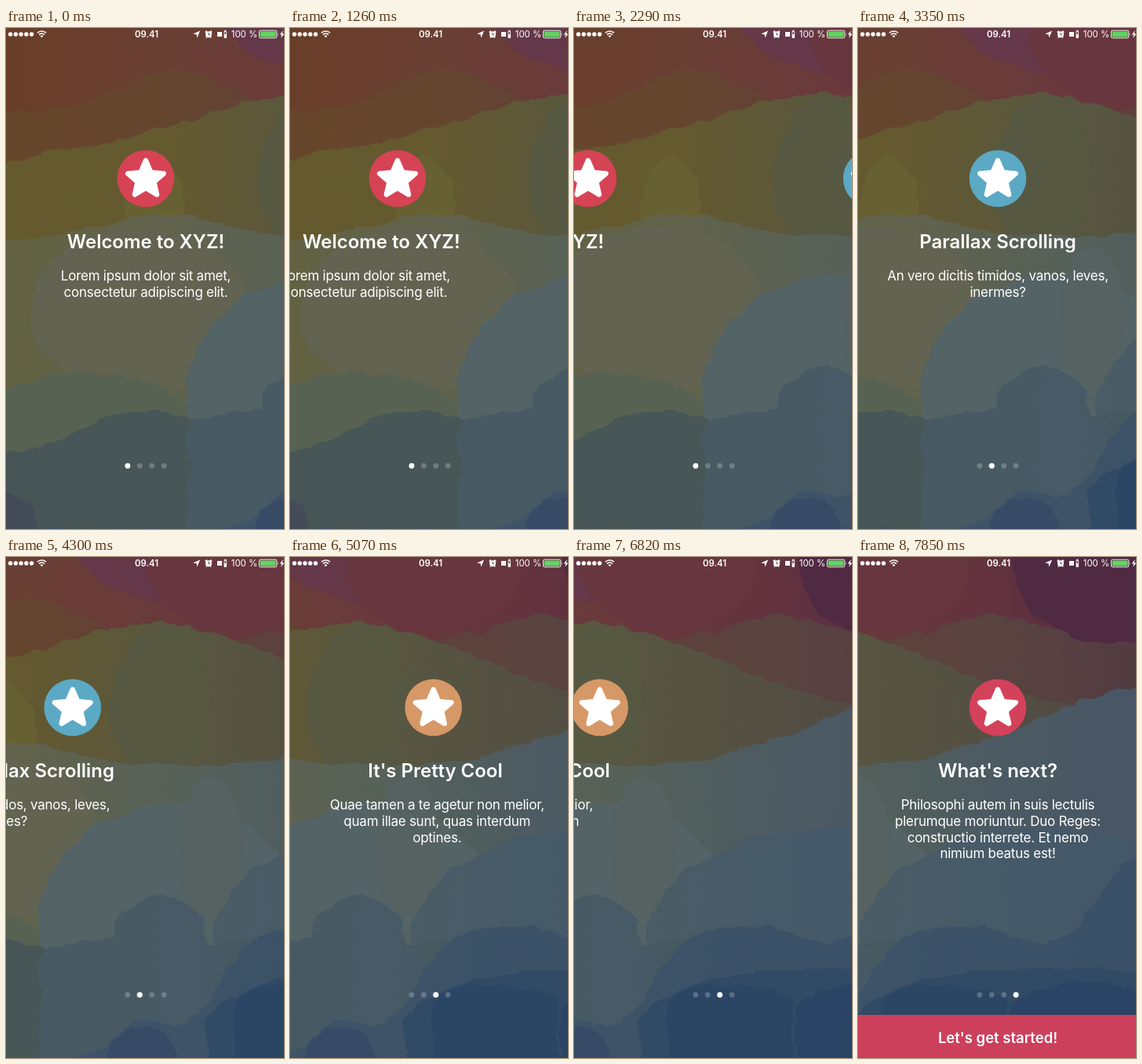
An HTML page for the animation above (8 s loop, 354 px wide and 639 px high).

```html
<!DOCTYPE html>
<html lang="en">
<head>
<meta charset="utf-8">
<title>Onboarding</title>
<style>
@property --s { syntax: "<number>"; inherits: true; initial-value: 0; }

html, body { margin: 0; width: 100%; height: 100%; overflow: hidden; background: #485656; }

main {
  position: relative; width: 354px; height: 639px; overflow: hidden;
  color: #fff; font-family: Inter, "Liberation Sans", sans-serif;
  -webkit-font-smoothing: antialiased;
  animation: scroll 8s linear infinite;
}
main svg, h2, p, button { position: absolute; }

/* --s is the scroll position in pages: a slow drag, then a release that snaps */
@keyframes scroll {
  0%, 11.75% { --s: 0; animation-timing-function: cubic-bezier(.3, .2, .7, .72); }
  15.75% { --s: .1136; animation-timing-function: linear; }
  28.625% { --s: .443; animation-timing-function: cubic-bezier(.3, .12, .4, 1); }
  37.25% { --s: 1; }
  48.125% { --s: 1; animation-timing-function: cubic-bezier(.35, .15, .7, .7); }
  53.75% { --s: 1.2576; animation-timing-function: cubic-bezier(.25, .17, .45, 1); }
  64.875% { --s: 2; }
  77.5% { --s: 2; animation-timing-function: cubic-bezier(.35, .15, .7, .7); }
  85.25% { --s: 2.4017; animation-timing-function: cubic-bezier(.25, .2, .45, 1); }
  94.75%, 100% { --s: 3; }
}

#wall { left: 0; top: 0; transform: translateX(calc(var(--s) * -150px)); }

section { --d: calc((var(--i) - var(--s)) * 361px); }
.icon { left: 141px; top: 155px; color: var(--c); transform: translateX(var(--d)); }
h2, p { left: 8px; width: 340px; margin: 0; text-align: center; white-space: nowrap; }
h2 {
  top: 258px; font-size: 24px; line-height: 30px; font-weight: 600; letter-spacing: -.02px;
  transform: translateX(calc(var(--d) * 1.5));
}
p {
  top: 306.4px; font-size: 17px; line-height: 20.6px; letter-spacing: -.25px;
  transform: translateX(calc(var(--d) * 2));
}

#bar, #dots { left: 0; top: 0; }
#bar text { font-size: 11.4px; }
#active { animation: page 8s step-end infinite; }
@keyframes page {
  0% { transform: none; }
  30.4% { transform: translateX(15.4px); }
  57.4% { transform: translateX(30.8px); }
  87% { transform: translateX(46.2px); }
}

button {
  left: 0; top: 584px; width: 354px; height: 55px; padding: 0 0 0 2px;
  border: 0; background: #cc405b; color: #fff;
  font: 600 18.5px/58px Inter, "Liberation Sans", sans-serif;
  animation: rise 8s infinite;
}
@keyframes rise {
  0%, 88.1% { transform: translateY(56px); animation-timing-function: cubic-bezier(.25, .4, .4, 1); }
  93.2%, 100% { transform: none; }
}
</style>
</head>
<body>
<main>
  <svg id="wall" width="820" height="639"></svg>

  <section style="--i:0; --c:#d64355">
    <svg class="icon" width="74" height="74"><use href="#badge"/></svg>
    <h2>Welcome to XYZ!</h2>
    <p>Lorem ipsum dolor sit amet,<br>consectetur adipiscing elit.</p>
  </section>
  <section style="--i:1; --c:#5ba9c4">
    <svg class="icon" width="74" height="74"><use href="#badge"/></svg>
    <h2>Parallax Scrolling</h2>
    <p>An vero dicitis timidos, vanos, leves,<br>inermes?</p>
  </section>
  <section style="--i:2; --c:#d69866">
    <svg class="icon" width="74" height="74"><use href="#badge"/></svg>
    <h2>It's Pretty Cool</h2>
    <p>Quae tamen a te agetur non melior,<br>quam illae sunt, quas interdum<br>optines.</p>
  </section>
  <section style="--i:3; --c:#d4415a">
    <svg class="icon" width="74" height="74"><use href="#badge"/></svg>
    <h2>What's next?</h2>
    <p>Philosophi autem in suis lectulis<br>plerumque moriuntur. Duo Reges:<br>constructio interrete. Et nemo<br>nimium beatus est!</p>
  </section>

  <svg id="dots" width="354" height="639" fill="none" stroke="#fff" stroke-width="6.8" stroke-linecap="round">
    <path d="M154.9 558.5h47" stroke-dasharray="0 15.4" stroke-opacity=".22"/>
    <path id="active" d="M154.9 558.5h0"/>
  </svg>

  <button>Let's get started!</button>

  <svg id="bar" width="354" height="18" fill="#fff">
    <defs>
      <g id="badge">
        <circle cx="37" cy="37" r="36.3" fill="currentColor"/>
        <path id="star" fill="#fff" stroke="#fff" stroke-width="6.4" stroke-linejoin="round"/>
      </g>
    </defs>
    <path d="M5.6 8H33" stroke="#fff" stroke-width="5.4" stroke-linecap="round" stroke-dasharray="0 6.75"/>
    <path d="M39.9 6.3a8 8 0 0 1 11.2 0M42 8.6a5 5 0 0 1 7 0" fill="none" stroke="#fff" stroke-width="1.6"/>
    <path d="M45.5 12.3l-1.9-2a2.7 2.7 0 0 1 3.8 0z"/>
    <text x="179" y="12" text-anchor="middle" font-weight="600">09.41</text>
    <path d="M247.2 3.6l-3.9 9-.7-4.3-4.4-.7z"/>
    <circle cx="258" cy="8.3" r="4"/>
    <path d="M253.7 5.6l2.3-2M262.3 5.6l-2.3-2M254.8 12.6l1-1M261.2 12.6l-1-1" stroke="#fff" stroke-width="1.4"/>
    <path d="M258 5.8v2.8h2" fill="none" stroke="#5e4040"/>
    <rect x="269" y="5" width="6" height="6"/>
    <path d="M278 4.3h2.6v8.2H278zM278.7 3h1.2v1.3h-1.2z" fill="none" stroke="#fff" stroke-width=".9"/>
    <path d="M278 8h2.6v4.5H278z"/>
    <text x="286.8" y="12">100 %</text>
    <rect x="322.4" y="3.2" width="22.4" height="9.6" rx="1.8" fill="none" stroke="#fff" stroke-width=".9"/>
    <rect x="323.6" y="4.4" width="20" height="7.2" rx=".8" fill="#62d463"/>
    <path d="M345.8 6.2q1.6 1.8 0 3.6z"/>
    <path d="M352.6 3.3l-3.9 5.2h2.4l-1 4.3 4.4-5.4h-2.6z"/>
  </svg>
</main>

<script>
const star = Array.from({ length: 10 }, (_, k) => {
  const r = k % 2 ? 11 : 24, a = k * Math.PI / 5;
  return [37 + r * Math.sin(a), 38 - r * Math.cos(a)].map(v => v.toFixed(2));
});
document.getElementById('star').setAttribute('d', 'M' + star.join('L') + 'Z');

let defs = '', shapes = '', count = 0;

// Several colours become an even left-to-right gradient across the wall.
function paint(...colors) {
  if (colors.length < 2) return colors[0];
  const id = 'g' + count++;
  const stops = colors.map((c, k) => `<stop offset="${k / (colors.length - 1)}" stop-color="${c}"/>`);
  defs += `<linearGradient id="${id}" gradientUnits="userSpaceOnUse" x2="820">${stops.join('')}</linearGradient>`;
  return `url(#${id})`;
}

// Everything below a line at height base, raised by bell-shaped hills.
function ridge(fill, base, ...hills) {
  let d = 'M-60 700';
  for (let x = -60; x <= 880; x += 10) {
    const y = hills.reduce((h, { at, rise, width }) => h - rise * Math.exp(-(((x - at) / width) ** 2)), base);
    d += `L${x} ${y.toFixed(1)}`;
  }
  shapes += `<path d="${d}L880 700Z" fill="${fill}"/>`;
}
const hill = (at, rise, width) => ({ at, rise, width });

// A round-topped column that reaches the floor.
function mound(fill, x, top, rx, ry) {
  shapes += `<path d="M${x - rx} 700V${top + ry}a${rx} ${ry} 0 0 1 ${2 * rx} 0V700Z" fill="${fill}"/>`;
}

function disc(fill, x, y, rx, ry) {
  shapes += `<ellipse cx="${x}" cy="${y}" rx="${rx}" ry="${ry}" fill="${fill}"/>`;
}

// reds and purples
const sky = paint('#693e27', '#693f34', '#69393c', '#63333f', '#512b40');
disc('#643848', 430, -10, 150, 72);
ridge(paint('#66462a', '#66452f', '#603f3a', '#5a4440', '#513b42'), 106, hill(215, 54, 90), hill(620, 32, 80));
disc('#68363e', 480, 20, 110, 74);
disc('#502a42', 770, 0, 125, 110);

// olive
ridge(paint('#645a2e', '#64592f', '#585740', '#544f43', '#4f4644'), 200, hill(380, 115, 230), hill(60, 25, 150));
disc('#676033', 190, 222, 38, 56);
disc('#575842', 385, 190, 62, 100);

// grey to teal
ridge(paint('#626241', '#61634c', '#566158', '#4c5b62', '#475566'), 270, hill(200, 32, 110), hill(820, 105, 200));
disc('#626350', 170, 360, 140, 105);
mound('#586253', 105, 440, 130, 60);
mound('#546365', 400, 315, 170, 155);
disc('#566261', 450, 370, 40, 90);
mound(paint('#4c5e64', '#4a5d65', '#43576a'), 690, 346, 237, 140);

// slate
ridge(paint('#475556', '#475757', '#455a65', '#43576a'), 548, hill(170, 58, 110), hill(520, 60, 200));
const slate = paint('#485a60', '#475a65', '#42576a');
mound(slate, 350, 486, 118, 20);
mound(slate, 385, 432, 60, 55);

// blues
ridge(paint('#3f5469', '#3e5368', '#3a5067'), 640, hill(360, 45, 45), hill(510, 135, 80), hill(620, 125, 80), hill(820, 260, 125));
mound('#374b66', 362, 598, 43, 40);
mound('#314a66', 690, 525, 245, 70);
mound('#2b4565', 560, 546, 80, 25);
mound('#2b4465', 742, 542, 98, 40);
mound('#434a58', 0, 594, 42, 45);

document.getElementById('wall').innerHTML = `
  <defs>${defs}
    <filter id="rough" filterUnits="userSpaceOnUse" x="-40" y="-30" width="900" height="710" color-interpolation-filters="sRGB">
      <feTurbulence type="fractalNoise" baseFrequency=".035" numOctaves="3" seed="4"/>
      <feDisplacementMap in="SourceGraphic" scale="14" xChannelSelector="R" yChannelSelector="G"/>
    </filter>
  </defs>
  <rect width="820" height="639" fill="${sky}"/>
  <g filter="url(#rough)">${shapes}</g>`;
</script>
</body>
</html>
```
